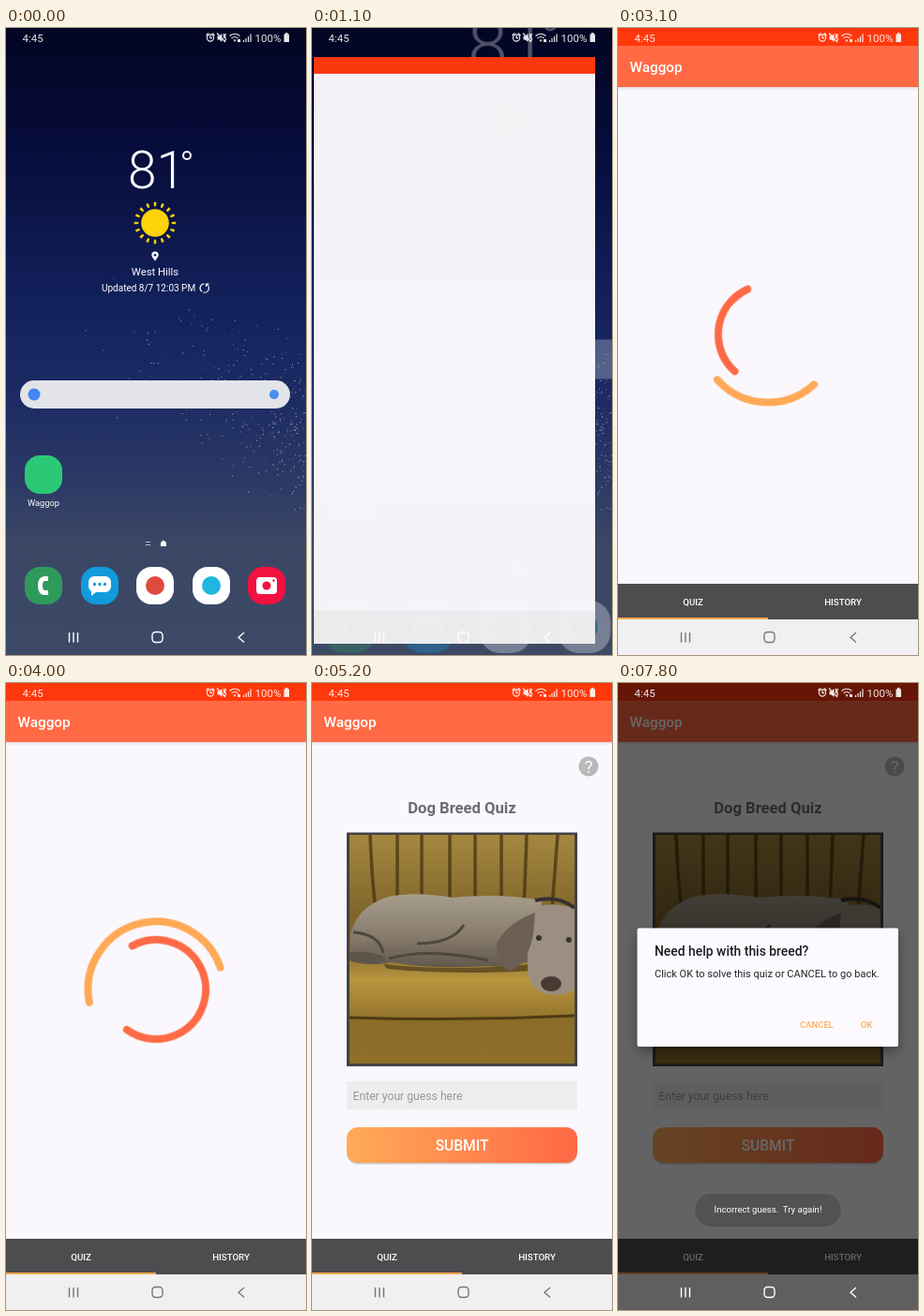
Animation of 320x669 px, one loop 8000 ms. Source, as an HTML page:

```html
<!DOCTYPE html>
<html lang="en">
<head>
<meta charset="utf-8">
<title>Dog breed quiz</title>
<style>
html, body { margin: 0; width: 100%; height: 100%; overflow: hidden; background: #020522; }
svg { display: block; width: 100vw; height: 100vh; }
text { font-family: Roboto, sans-serif; fill: #fff; }
.mid { text-anchor: middle; }
.med { font-weight: 500; }

/* One 8 s clock; 1.25% is one 100 ms step. */
.play { animation: 8s -40ms infinite step-end both; }

#home { animation-name: zoom; transform-origin: 40px 485px; }
@keyframes zoom {
  0% { transform: none; opacity: 1; }
  12.5% { transform: scale(1.18); opacity: .75; }
  13.75% { transform: scale(1.4); opacity: .3; }
  15%, 100% { transform: scale(1.5); opacity: 0; }
}
#window { animation-name: launch; }
@keyframes launch {
  0% { transform: translate(20px, 456px) scale(.125, .06); opacity: 0; }
  12.5% { transform: translate(9px, 205px) scale(.606, .577); opacity: .7; }
  13.75% { transform: translate(2px, 31px) scale(.938, .936); opacity: .98; }
  15% { transform: translate(0, 5px) scale(.99, .99); opacity: 1; }
  16.25%, 100% { transform: none; opacity: 1; }
}
#chrome { animation-name: chrome; }
@keyframes chrome {
  0% { opacity: 0; }
  30% { opacity: .68; }
  31.25%, 100% { opacity: 1; }
}
#loader { animation-name: loader; }
@keyframes loader { 0% { opacity: 1; } 51.25%, 100% { opacity: 0; } }
#loader circle { fill: none; stroke-width: 8; stroke-linecap: round; transform-origin: 160px 327px; }
#outer { animation-name: outer; }
@keyframes outer {
  0%, 30% { transform: rotate(-47deg); stroke-dasharray: 27.5 332.5; animation-timing-function: steps(16); }
  50%, 100% { transform: rotate(169deg); stroke-dasharray: 172 188; }
}
#inner { animation-name: inner; }
@keyframes inner {
  0%, 30% { transform: rotate(-33deg); stroke-dasharray: 12 348; animation-timing-function: steps(16); }
  50%, 100% { transform: rotate(-478.5deg); stroke-dasharray: 244.5 115.5; }
}
#quiz { animation-name: quiz; }
@keyframes quiz { 0% { opacity: 0; } 51.25%, 100% { opacity: 1; } }
#shimmer { animation-name: shimmer; }
@keyframes shimmer {
  0% { transform: translateX(-300px); }
  53.75% { transform: translateX(-67px); animation-timing-function: steps(5); }
  60% { transform: translateX(261px); }
  61.25%, 100% { transform: translateX(600px); }
}
#photo { animation-name: photo; }
@keyframes photo {
  0% { opacity: 0; }
  63.75% { opacity: .6; }
  65%, 100% { opacity: 1; }
}
#press { animation-name: press; transform-origin: 160px 493px; }
@keyframes press {
  0% { transform: scale(.2); opacity: 0; }
  73.75% { transform: scale(.3); opacity: .14; animation-timing-function: steps(3); }
  77.5% { transform: scale(1); opacity: .14; animation-timing-function: steps(3); }
  81.25%, 100% { transform: scale(1); opacity: 0; }
}
#toast { animation-name: toast; }
@keyframes toast {
  0%, 77.5% { opacity: 0; animation-timing-function: steps(4); }
  82.5%, 100% { opacity: 1; }
}
#tap { animation-name: tap; transform-origin: 295px 89px; }
@keyframes tap {
  0% { transform: scale(.5); opacity: 0; }
  90% { transform: scale(.6); opacity: .14; animation-timing-function: steps(2); }
  92.5% { transform: scale(1); opacity: .1; }
  95%, 100% { transform: scale(1); opacity: 0; }
}
#dim { animation-name: dim; }
@keyframes dim {
  0%, 91.25% { opacity: 0; animation-timing-function: steps(4); }
  96.25%, 100% { opacity: .6; }
}
#dialog { animation-name: dialog; transform-origin: 160px 325px; }
#dialog rect { filter: drop-shadow(0 5px 6px rgba(0, 0, 0, .35)); }
@keyframes dialog {
  0%, 92.5% { opacity: 0; transform: scale(.92); animation-timing-function: steps(3); }
  96.25%, 100% { opacity: 1; transform: none; }
}
#nav { animation-name: nav; fill: none; stroke-width: 1.4; }
@keyframes nav {
  0% { stroke: #fff; }
  16.25% { stroke: #777678; }
  93.75%, 100% { stroke: #fff; }
}
</style>
</head>
<body>
<svg viewBox="0 0 320 669" preserveAspectRatio="none">
<defs>
  <linearGradient id="night" x2="0" y2="1">
    <stop offset="0" stop-color="#020522"/>
    <stop offset=".2" stop-color="#070d3c"/>
    <stop offset=".45" stop-color="#13225d"/>
    <stop offset=".6" stop-color="#1d2d63"/>
    <stop offset=".72" stop-color="#2b3965"/>
    <stop offset=".82" stop-color="#3b4665"/>
    <stop offset="1" stop-color="#3c4a66"/>
  </linearGradient>
  <linearGradient id="warm">
    <stop offset="0" stop-color="#ffab58"/>
    <stop offset="1" stop-color="#ff6845"/>
  </linearGradient>
  <linearGradient id="gleam">
    <stop offset="0" stop-color="#959497" stop-opacity="0"/>
    <stop offset=".5" stop-color="#959497"/>
    <stop offset="1" stop-color="#959497" stop-opacity="0"/>
  </linearGradient>
  <linearGradient id="couch" x2="0" y2="1">
    <stop offset="0" stop-color="#a5873f"/>
    <stop offset=".35" stop-color="#7f652a"/>
    <stop offset="1" stop-color="#8f6f28"/>
  </linearGradient>
  <linearGradient id="cushion" x2="0" y2="1">
    <stop offset="0" stop-color="#8f7130"/>
    <stop offset=".4" stop-color="#b8963f"/>
    <stop offset="1" stop-color="#94742c"/>
  </linearGradient>
  <linearGradient id="fur" x2="0" y2="1">
    <stop offset="0" stop-color="#a89e8c"/>
    <stop offset=".6" stop-color="#857a6a"/>
    <stop offset="1" stop-color="#61574b"/>
  </linearGradient>
  <linearGradient id="shade" x2="0" y2="1">
    <stop offset="0" stop-opacity=".1"/>
    <stop offset="1" stop-opacity="0"/>
  </linearGradient>
  <clipPath id="frame"><rect x="40" y="162" width="240" height="244"/></clipPath>
  <clipPath id="pill"><rect x="37" y="474" width="246" height="38" rx="12"/></clipPath>
  <rect id="tile" width="40" height="40" rx="16"/>
</defs>

<rect width="320" height="669" fill="url(#night)"/>
<path id="stars" stroke="#dfe4ee" stroke-width="1" opacity=".6"/>

<g id="home" class="play">
  <text x="130" y="171" font-size="55" font-weight="300">81</text>
  <circle cx="193" cy="136" r="4" fill="none" stroke="#fff" stroke-width="2"/>
  <circle cx="159" cy="208" r="14.800" fill="#fdd20a"/>
  <circle cx="159" cy="208" r="20" fill="none" stroke="#fdd20a" stroke-width="4.500" pathLength="64" stroke-dasharray="1.300 2.700" stroke-dashoffset=".65"/>
  <path d="M159 248.500C156.500 245 155.300 244 155.300 242.300a3.700 3.700 0 0 1 7.400 0C162.700 244 161.500 245 159 248.500Z" fill="#fff"/>
  <circle cx="159" cy="242.300" r="1.300" fill="#111c52"/>
  <text class="mid" x="159" y="263.500" font-size="11.300">West Hills</text>
  <text x="102" y="281" font-size="10">Updated 8/7 12:03 PM</text>
  <path d="M209 281.200A4.500 4.500 0 0 1 211.500 273M213 273.100A4.500 4.500 0 0 1 210.500 282M213.500 276v-3h3" fill="none" stroke="#fff" stroke-width="1.200"/>

  <rect x="15" y="376" width="288" height="30" rx="15" fill="#e2e4e8"/>
  <circle cx="30" cy="391" r="6.500" fill="#4285f4"/>
  <circle cx="286" cy="391" r="5" fill="#4a8df0"/>

  <rect x="20" y="456" width="40" height="41" rx="16" fill="#2bc975"/>
  <text class="mid" x="40" y="509.500" font-size="9.300">Waggop</text>

  <path d="M149 548.500h5M149 551.500h5" stroke="#b9bfd0"/>
  <path d="M165 553v-4l3-2.500 3 2.500v4Z" fill="#fff"/>

  <use href="#tile" x="20" y="575" fill="#2f9b5b"/>
  <path d="M45 587.500h-3.500q-5 0-5 7.500t5 7.500h3.500" fill="none" stroke="#fff" stroke-width="5" stroke-linejoin="round"/>
  <use href="#tile" x="80" y="575" fill="#129bdc"/>
  <path d="M94 585h12a6 6 0 0 1 6 6v5a6 6 0 0 1-6 6h-10l-5 4v-5a6 6 0 0 1-3-5v-5a6 6 0 0 1 6-6Z" fill="#fff"/>
  <path d="M94.500 593.500h.01M100 593.500h.01M105.500 593.500h.01" stroke="#129bdc" stroke-width="3.400" stroke-linecap="round"/>
  <use href="#tile" x="139" y="575" fill="#fff"/>
  <circle cx="159" cy="595" r="10" fill="#dd4b3e"/>
  <use href="#tile" x="199" y="575" fill="#fff"/>
  <circle cx="219" cy="595" r="10" fill="#20b6e0"/>
  <use href="#tile" x="258" y="575" fill="#f2113f"/>
  <rect x="267" y="586" width="22" height="18" rx="4" fill="#fff"/>
  <circle cx="278" cy="595" r="4.500" fill="#f2113f"/>
  <circle cx="285.500" cy="589.500" r="1.200" fill="#f2113f"/>
</g>

<g id="window" class="play">
  <rect width="320" height="669" fill="#faf8fc"/>
  <rect width="320" height="19" fill="#ff380c"/>
  <rect y="631" width="320" height="38" fill="#f0eff1"/>
</g>

<g id="chrome" class="play">
  <rect y="63" width="320" height="4" fill="url(#shade)"/>
  <rect y="19" width="320" height="44" fill="#ff6a45"/>
  <text class="med" x="12.500" y="47" font-size="15.300">Waggop</text>
  <rect y="593" width="320" height="38" fill="#4d4c4e"/>
  <rect y="629" width="160" height="2" fill="#ffa954"/>
  <text class="mid med" x="80" y="616" font-size="9.700">QUIZ</text>
  <text class="mid med" x="240" y="616" font-size="9.700">HISTORY</text>
  <g id="loader" class="play">
    <circle id="outer" class="play" cx="160" cy="327" r="72.500" pathLength="360" stroke="#ffa957"/>
    <circle id="inner" class="play" cx="160" cy="327" r="53" pathLength="360" stroke="#ff6a46"/>
  </g>
</g>

<g id="quiz" class="play">
  <circle cx="295" cy="89" r="10.500" fill="#b9b8ba"/>
  <text class="mid" x="295" y="95.500" font-size="18.500">?</text>
  <circle id="tap" class="play" cx="295" cy="89" r="17"/>
  <text class="mid" x="160" y="139" font-size="16.600" font-weight="700" style="fill:#6c6b6e">Dog Breed Quiz</text>

  <rect x="37" y="159.500" width="246" height="249.500" fill="#434144"/>
  <g clip-path="url(#frame)">
    <rect x="40" y="162" width="240" height="244" fill="#6e6d70"/>
    <g id="shimmer" class="play">
      <rect x="-130" y="-130" width="260" height="260" fill="url(#gleam)" transform="translate(0 284) skewX(-20)"/>
    </g>
    <g id="photo" class="play">
      <rect x="40" y="162" width="240" height="244" fill="url(#couch)"/>
      <path d="M62 162q2 50 6 80M91 162v80M117 162v80M147 162v80M174 162v80M202 162v80M229 162l-3 80M262 162l-6 80" fill="none" stroke="#45330f" stroke-width="3.500" opacity=".75"/>
      <path d="M40 290H280V354Q160 360 40 356Z" fill="url(#cushion)"/>
      <path d="M40 357Q160 361 280 355" fill="none" stroke="#4f3a14" stroke-width="3"/>
      <path d="M76 300Q150 308 236 300V307Q150 312 80 305Z" fill="#4d3c1c" opacity=".7"/>
      <path d="M41 268Q48 238 82 228Q110 222 150 229Q200 224 245 232L246 290Q218 306 188 302Q130 306 84 298Q58 304 41 292Z" fill="url(#fur)"/>
      <path d="M40 287Q62 286 78 292Q80 299 64 300Q50 300 40 296Z" fill="#5e554a"/>
      <path d="M82 294Q125 282 188 296M112 278Q150 278 162 258M76 288Q72 268 44 266" fill="none" stroke="#50473c" stroke-width="3"/>
      <path d="M230 246Q246 230 280 240V326Q270 335 250 332Q231 326 230 305Z" fill="#9a8f80"/>
      <path d="M238 245Q208 256 197 278Q196 302 212 307Q230 300 236 268Z" fill="#6b6053"/>
      <path d="M238 232Q262 226 280 240" fill="none" stroke="#34312e" stroke-width="4"/>
      <ellipse cx="255" cy="321" rx="11" ry="8" fill="#493b34"/>
      <circle cx="242" cy="272" r="3" fill="#39332b"/>
      <circle cx="274" cy="274" r="3" fill="#39332b"/>
    </g>
  </g>

  <rect x="37" y="425" width="246" height="30" rx="1.500" fill="#eeecef"/>
  <text x="43.500" y="444.500" font-size="12.200" style="fill:#98979a">Enter your guess here</text>
  <rect x="37" y="475.500" width="246" height="38" rx="12" opacity=".18"/>
  <rect x="37" y="474" width="246" height="38" rx="12" fill="url(#warm)"/>
  <g clip-path="url(#pill)"><circle id="press" class="play" cx="160" cy="493" r="126"/></g>
  <text class="mid med" x="160" y="498.700" font-size="15.600">SUBMIT</text>
</g>

<rect id="dim" class="play" width="320" height="669"/>
<g id="toast" class="play">
  <rect x="82" y="545" width="156" height="35" rx="17.500" fill="#505052" fill-opacity=".9"/>
  <text class="mid" x="160" y="565.300" font-size="9.600">Incorrect guess.&#160; Try again!</text>
</g>
<g id="dialog" class="play">
  <rect x="20.500" y="261.500" width="278.500" height="126.500" rx="2" fill="#fcfafe"/>
  <text class="med" x="39" y="291" font-size="13.900" style="fill:#1d1c1f">Need help with this breed?</text>
  <text x="39" y="313.500" font-size="11" style="fill:#262528">Click OK to solve this quiz or CANCEL to go back.</text>
  <g class="mid med" font-size="9.500">
    <text x="212" y="367.500" style="fill:#ffab5c">CANCEL</text>
    <text x="265" y="367.500" style="fill:#ffab5c">OK</text>
  </g>
</g>

<g opacity=".9">
  <text x="17.500" y="14.500" font-size="11.500">4:45</text>
  <text x="265.500" y="14.500" font-size="11.500">100%</text>
  <g fill="none" stroke="#fff" stroke-width="1.200">
    <circle cx="218" cy="10.500" r="3.600"/>
    <path d="M218 8v2.700h2M213.500 8l2.500-2.500M222.500 8l-2.500-2.500M225 5.500l9 9.500M232.500 6v5M234.500 6l-1 3 1 3-1 2"/>
    <path d="M238.500 8.500q5.500-4.500 11 0M240.500 11q3.500-3 7 0M253.500 15v-2M256 15v-4M258.500 15V9M261 15V6.500"/>
  </g>
  <path d="M225.500 8.500h2l3-2.500v9l-3-2.500h-2ZM242.500 12.500h3l-1.500 2.500ZM247 12h3v3h-3ZM296.500 6.500h1.500v-1.500h2.500v1.500h1.500v8.500h-5.500Z" fill="#fff"/>
</g>
<g id="nav" class="play">
  <path d="M67.500 645v10.500M72 645v10.500M76.500 645v10.500"/>
  <rect x="156" y="644.500" width="11" height="11" rx="3.500"/>
  <path d="M254 645l-6 5.300 6 5.300"/>
</g>
</svg>
<script>
// Star dust drifts down to the right and thickens toward the edge.
let seed = 7;
const rand = () => (seed = seed * 16807 % 2147483647) / 2147483647;
let dust = "";
for (let i = 0; i < 330; i++) {
  const x = 75 + 245 * Math.cbrt(rand());
  const y = 325 + (x - 75) * 0.42 + (rand() + rand() + rand() - 1.5) * 75;
  dust += `M${x.toFixed(1)} ${y.toFixed(1)}h${(0.4 + rand()).toFixed(1)}`;
}
document.getElementById("stars").setAttribute("d", dust);
</script>
</body>
</html>
```
